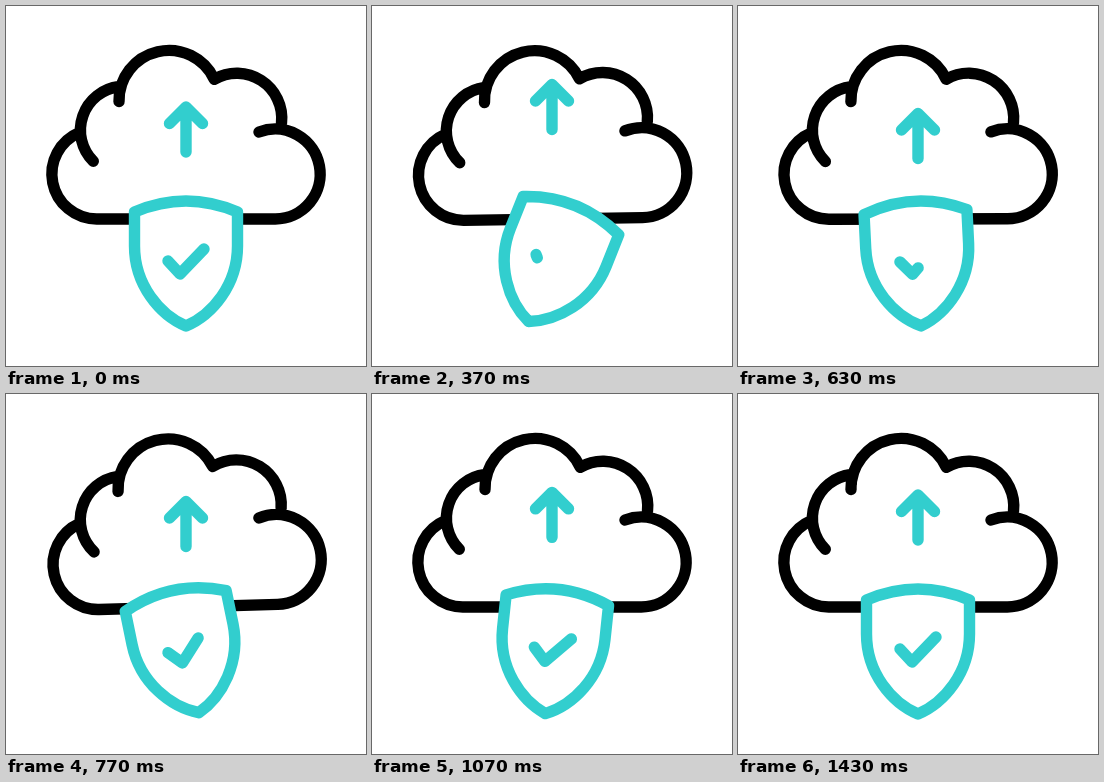
Write an HTML page that moves like this. It is 360 px wide and 360 px high and loops after 1670 ms.

```html
<!DOCTYPE html>
<html lang="en">
<head>
<meta charset="utf-8">
<title>Secure cloud upload</title>
<style>
  html, body { margin: 0; width: 100%; height: 100%; overflow: hidden; background: #fff; }
  svg { display: block; width: 100vw; height: 100vh; }
  path { fill: none; stroke-width: 11.4; stroke-linecap: round; stroke-linejoin: round; }
  #cloud { stroke: #000; }
  #arrow, #shield { stroke: #32cece; }
  #body { fill: #fff; }
</style>
</head>
<body>
<svg viewBox="0 0 360 360">
  <path id="cloud" d="M253 126A45 45 0 1 1 269.3 213H90.7A45 45 0 0 1 73.5 126.5
    M87.3 155.3A44 44 0 0 1 113.3 80.5M113 95.5A50 50 0 0 1 208.3 73.3A45 45 0 0 1 275.5 117"/>
  <path id="arrow" d="M180 146V101M163.5 117.5L180 101L196.5 117.5"/>
  <g id="shield">
    <path id="body" d="M128.5 206Q180 184 231.5 206V240C231.5 279 206 309 180 320C154 309 128.5 279 128.5 240Z"/>
    <path id="check" pathLength="1" d="M162 255L174 268L198 243"/>
  </g>
</svg>
<script>
const LOOP = 1670, FPS = 30;
const [cloud, arrow, shield, check] =
  ["cloud", "arrow", "shield", "check"].map(id => document.getElementById(id));

function ease(p) {
  p = Math.min(1, Math.max(0, p));
  return p * p * (3 - 2 * p);
}

// Moves to `size` at frame `first`, then swings back twice, shrinking, and rests.
function swing(frame, { start, first, step, size, decay }) {
  if (frame < first) return size * ease((frame - start) / (first - start));
  const peak = n => n < 3 ? size * (-decay) ** n : 0;
  const turns = (frame - first) / step, n = Math.floor(turns);
  return peak(n) + (peak(n + 1) - peak(n)) * ease(turns - n);
}

const cloudTurn = { start: 0, first: 6.3, step: 7.6, size: -12.6, decay: 0.38 };
const arrowShift = { start: 0, first: 12, step: 8.5, size: -23, decay: 0.4 };
const shieldTurn = { start: 4.5, first: 12.5, step: 9.7, size: 24, decay: 0.5 };

function draw() {
  const time = performance.now() % LOOP;
  const frame = Math.floor((time + 4) * FPS / 1000);
  cloud.setAttribute("transform", `rotate(${swing(frame, cloudTurn)} 180 129)`);
  arrow.setAttribute("transform", `translate(0 ${swing(frame, arrowShift)})`);
  shield.setAttribute("transform", `rotate(${swing(frame, shieldTurn)} 180 257)`);

  const sinceErased = frame - 12.5;
  const drawn = Math.max(0.01, ease(-sinceErased / 9.5), ease(sinceErased / 13));
  check.style.strokeDasharray = `${drawn} 2`;
  requestAnimationFrame(draw);
}
draw();
</script>
</body>
</html>
```
